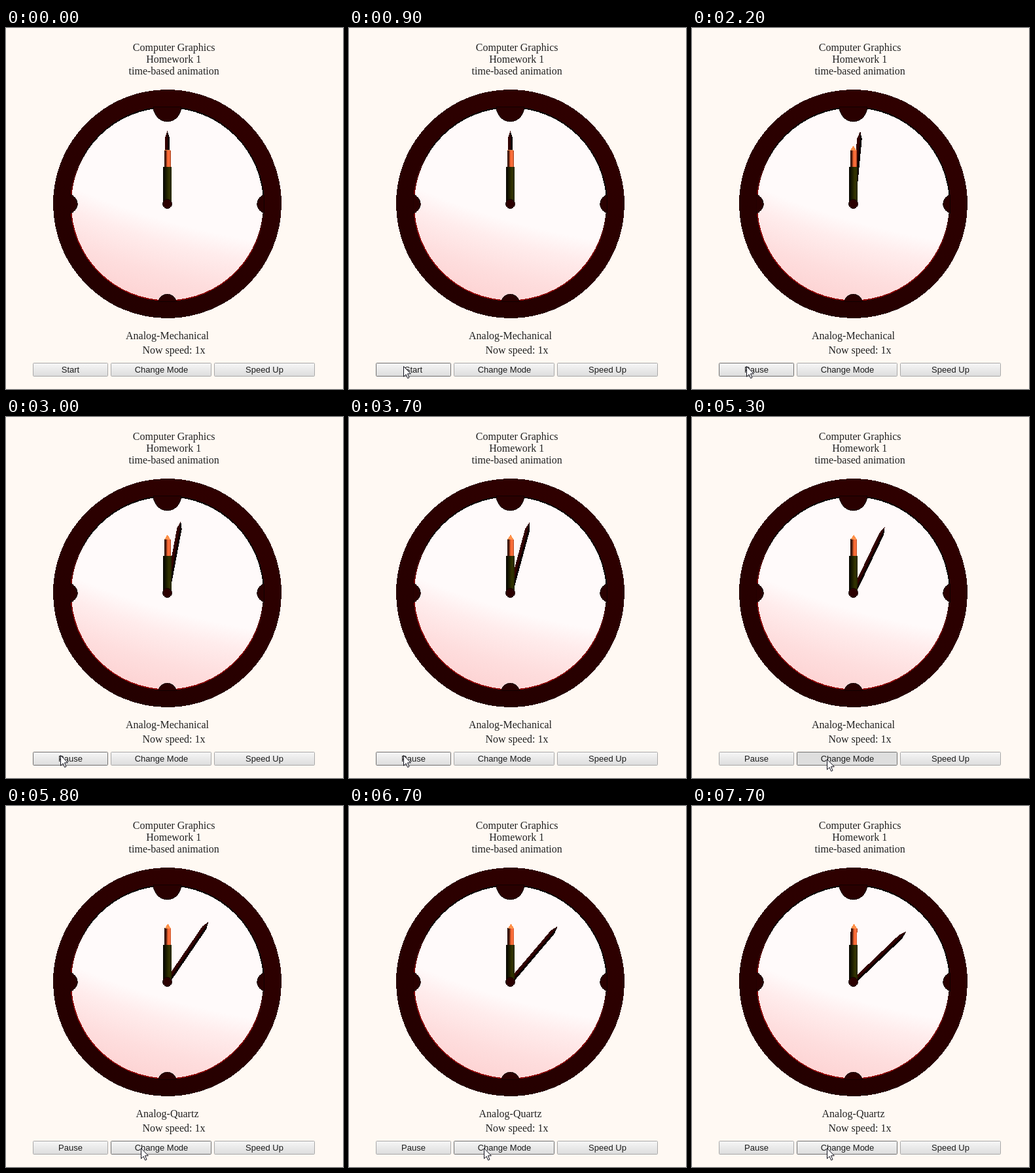
An HTML page that plays this animation: 515x551 px, repeating every 8000 ms.

```html
<!DOCTYPE html>
<html lang="en">
<head>
<meta charset="utf-8">
<title>Time-based animation</title>
<style>
  html, body { margin: 0; width: 100%; height: 100%; overflow: hidden; background: #fff9f3; }
  svg { display: block; width: 515px; height: 551px; text-anchor: middle; }
  .serif { font: 16px "Liberation Serif", "Times New Roman", serif; fill: #222; }
  .button text { font: 13px "Liberation Sans", Arial, sans-serif; fill: #1c1c1c; }
  .button rect { fill: url(#button); stroke: #a8a8a8; }
  .button.hover rect { stroke: #707070; }
  .button.pressed rect { fill: #dedede; }
</style>
</head>
<body>
<svg viewBox="0 0 515 551">
  <defs>
    <radialGradient id="face" gradientUnits="userSpaceOnUse" cx="324" cy="-1117" r="1320">
      <stop offset=".9" stop-color="#fffafa"/><stop offset=".925" stop-color="#ffecec"/>
      <stop offset=".96" stop-color="#fedede"/><stop offset="1" stop-color="#fdd2d2"/>
    </radialGradient>
    <linearGradient id="ring" x1=".8" y1="0" x2=".2" y2="1">
      <stop offset="0" stop-color="#300000"/><stop offset="1" stop-color="#230000"/>
    </linearGradient>
    <linearGradient id="rim" x1=".65" y1="0" x2=".35" y2="1">
      <stop offset=".35" stop-color="#080000"/><stop offset=".6" stop-color="#7c0000"/>
      <stop offset="1" stop-color="#960000"/>
    </linearGradient>
    <linearGradient id="hour">
      <stop offset="0" stop-color="#050500"/><stop offset=".3" stop-color="#151600"/>
      <stop offset=".7" stop-color="#333400"/><stop offset="1" stop-color="#242500"/>
    </linearGradient>
    <linearGradient id="minute">
      <stop offset="0" stop-color="#200803"/><stop offset=".3" stop-color="#5a2410"/>
      <stop offset=".5" stop-color="#f0622f"/><stop offset=".8" stop-color="#ff7440"/>
      <stop offset="1" stop-color="#b84a24"/>
    </linearGradient>
    <linearGradient id="second">
      <stop offset=".1" stop-color="#300000"/><stop offset=".5" stop-color="#340000"/>
      <stop offset=".65" stop-color="#080000"/>
    </linearGradient>
    <linearGradient id="button" x2="0" y2="1">
      <stop offset="0" stop-color="#f7f7f7"/><stop offset=".4" stop-color="#ececec"/>
      <stop offset="1" stop-color="#dddddd"/>
    </linearGradient>
  </defs>

  <g class="serif">
    <text x="256.7" y="35">Computer Graphics</text>
    <text x="256.2" y="53">Homework 1</text>
    <text x="256.7" y="71">time-based animation</text>
    <text id="mode" x="246.5" y="475"></text>
    <text x="256.5" y="497">Now speed: 1x</text>
  </g>

  <!-- Clock, centred on its axis -->
  <g transform="translate(246.5 268.5)" shape-rendering="crispEdges">
    <circle r="174.5" fill="url(#ring)"/>
    <circle r="148.5" fill="url(#rim)"/>
    <circle cy=".2" r="146.7" fill="url(#face)"/>
    <g fill="#290000" stroke="#0c0000" stroke-width=".8">
      <path d="M-21.5-148.5h43A21.5 22.8 0 0 1-21.5-148.5z"/>
      <path d="M-148-14A14.5 14.5 0 0 1-148 14z"/>
      <path d="M148-14A14.5 14.5 0 0 0 148 14z"/>
      <path d="M-14 148.5A14.5 14.5 0 0 1 14 148.5z"/>
    </g>
    <path id="minuteTip" d="M-5-81L0-89L5-81z" fill="#ff9048"/>
    <path id="secondHand" d="M-3.7 0V-100L0-111.5L3.7-100V0z" fill="url(#second)"/>
    <g id="minuteHand">
      <path d="M-5-56V-82H5V-56z" fill="url(#minute)"/>
      <path d="M-4.5-81.7h9" stroke="#ffa060" stroke-width=".8"/>
    </g>
    <path id="hourHand" d="M-6.5 0V-56.5H6.5V0z" fill="url(#hour)"/>
    <circle r="7" fill="#2b0000" stroke="#0e0000" stroke-width=".8"/>
  </g>

  <g class="button"><rect x="41.5" y="511.5" width="114" height="20" rx="1"/><text id="start" x="98.5" y="526"></text></g>
  <g class="button"><rect x="160.5" y="511.5" width="153" height="20" rx="1"/><text x="237.5" y="526">Change Mode</text></g>
  <g class="button"><rect x="318.5" y="511.5" width="153" height="20" rx="1"/><text x="395" y="526">Speed Up</text></g>

  <path id="cursor" d="M-.5.5V16.2L3.1 12.8L5.6 18.6L8 17.6L5.5 11.8H10.4z" fill="#fff" stroke="#10101c"/>
</svg>
<script>
  const LOOP = 8000, STEP = 100;
  const STARTED = 1400, SWITCHED = 5400;
  const $ = id => document.getElementById(id);
  const buttons = [...document.querySelectorAll('.button')];

  // Pointer path: time, x, y
  const path = [
    [200, 473, 48], [300, 400, 88], [400, 304, 157], [500, 222, 262],
    [600, 152, 392], [700, 104, 482], [800, 87, 511], [900, 84, 516],
    [4100, 84, 516], [4500, 173, 519], [4900, 197, 522], [5200, 207, 522], [LOOP, 207, 522]
  ];
  const ticks = [5800, 6700, 7700];

  function pointerAt(t) {
    const i = Math.max(1, path.findIndex(p => p[0] > t));
    const [a, b] = [path[i - 1], path[i]];
    const k = (t - a[0]) / (b[0] - a[0]);
    return [1, 2].map(n => Math.round(a[n] + (b[n] - a[n]) * k));
  }

  function secondAngle(t) {
    if (t < STARTED) return 0;
    if (t < SWITCHED) return (t - 1360) * 0.0065;
    return 28.4 + 6 * ticks.filter(tick => t >= tick).length;
  }

  const turn = (id, angle) => $(id).setAttribute('transform', `rotate(${angle})`);
  const justAfter = (t, event) => t >= event && t < event + STEP;

  function draw(t) {
    const angle = secondAngle(t);
    turn('secondHand', angle);
    turn('minuteTip', angle / 60);
    turn('minuteHand', angle / 60);
    turn('hourHand', angle / 720);

    $('mode').textContent = t < SWITCHED ? 'Analog-Mechanical' : 'Analog-Quartz';
    $('start').textContent = t < STARTED ? 'Start' : 'Pause';

    const [x, y] = pointerAt(t);
    $('cursor').setAttribute('transform', `translate(${x} ${y})`);
    $('cursor').style.display = t < 200 ? 'none' : '';

    const pressed = [justAfter(t, STARTED), justAfter(t, SWITCHED - STEP), false];
    buttons.forEach((button, i) => {
      const box = button.firstChild;
      const left = box.x.baseVal.value, right = left + box.width.baseVal.value;
      const over = t >= 200 && y >= 511 && y <= 532 && x >= left && x <= right;
      button.classList.toggle('hover', over);
      button.classList.toggle('pressed', pressed[i]);
    });
  }

  const origin = performance.now();
  function frame() {
    const t = (performance.now() - origin) % LOOP;
    draw(Math.floor(t / STEP) * STEP);
    requestAnimationFrame(frame);
  }
  frame();
</script>
</body>
</html>
```
